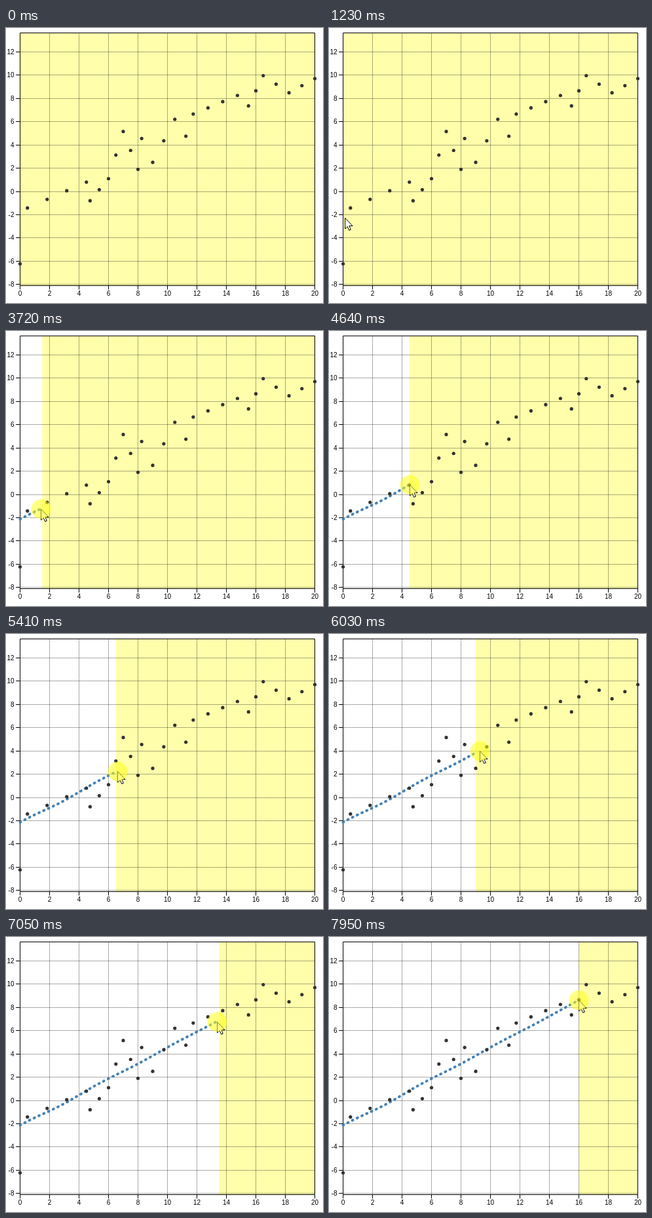
An HTML page that plays this animation: 484x419 px, repeating every 8 s.

```html
<!DOCTYPE html>
<html lang="en">
<head>
<meta charset="utf-8">
<title>Draw the trend</title>
<style>
  html, body { margin: 0; width: 100%; height: 100%; overflow: hidden; background: #fff; }
  svg { display: block; width: 484px; height: 419px; }
  text { font: 10px "Liberation Sans", Arial, sans-serif; }
  .grid { stroke: #000; stroke-opacity: .33; fill: none; }
  .axis { stroke: #000; fill: none; }
  .drawn { stroke: steelblue; stroke-width: 4; stroke-dasharray: 1 7; stroke-linecap: round; fill: none; }
</style>
</head>
<body>
<svg viewBox="0 0 484 419">
  <rect id="cover" y="8" height="384" fill="#ffffab"/>
  <path id="grid" class="grid"/>
  <path id="axis" class="axis"/>
  <g id="labels"></g>
  <path id="line" class="drawn"/>
  <g id="dots" fill="#333"></g>
  <g id="pointer">
    <path d="M.5 .5V17L4.2 13.5 6.7 19.3 9.3 18.2 6.9 12.5H12Z" fill="#fff" stroke="#000"/>
    <circle id="halo" cx=".5" cy=".5" r="15" fill="rgb(255,255,20)" fill-opacity=".54"/>
  </g>
</svg>
<script>
const LOOP = 8000, ENTER = 70, PRESS = 1530, UNCOVER = 2160, DRAG = 2930;
const LEFT = 21.5, RIGHT = 471.5, TOP = 7.5, BOTTOM = 392.5;
const $ = id => document.getElementById(id);
const px = x => LEFT + 22.5 * x;
const py = y => 249 - 17.73 * y;
const mix = (a, b, u) => a + (b - a) * u;

function add(parent, tag, attrs, text) {
  const el = document.createElementNS("http://www.w3.org/2000/svg", tag);
  for (const key in attrs) el.setAttribute(key, attrs[key]);
  if (text !== undefined) el.textContent = text;
  parent.appendChild(el);
}

// Turning points of the data; wide gaps are filled with evenly spaced dots
const turns = [
  [0, -6.22], [.5, -1.42], [4.5, .8], [4.75, -.8], [6, 1.1], [7, 5.15],
  [8, 1.9], [8.25, 4.55], [9, 2.5], [10.5, 6.2], [11.25, 4.75], [11.75, 6.65],
  [14.75, 8.25], [15.5, 7.35], [16.5, 9.95], [18.25, 8.48], [20, 9.7]
];

// Time and pointer x while dragging
const drag = [
  [DRAG, 22], [3702, 53], [4628, 122.5], [5400, 170], [6018, 229.5], [7021, 322], [7948, 381]
];

function dragX(t) {
  const i = drag.findIndex(key => key[0] >= t);
  if (i < 0) return drag[drag.length - 1][1];
  if (i === 0) return drag[0][1];
  const [a, b] = [drag[i - 1], drag[i]];
  return mix(a[1], b[1], (t - a[0]) / (b[0] - a[0]));
}

// Nearly straight hand-drawn line with a wobble that dies away
function trendY(x) {
  const wobble = 1.8 * Math.sin((x - 60) / 18.5) * Math.exp((LEFT - x) / 200);
  return 288.5 - (x - LEFT) * .5333 + wobble;
}

const hold = (t, start, step) => start + Math.floor((t - start) / step) * step;

function pointerAt(t) {
  if (t >= DRAG) {
    const x = dragX(hold(t, DRAG, 77.2));
    return [x, trendY(x)];
  }
  if (t >= 2470) return [22, 291];
  if (t >= 1230) return [24, 289];
  if (t >= 1000) return [19, 293];
  const u = Math.min(1, (hold(t, ENTER, 77.7) - ENTER) / 699);
  const k = 1 - Math.pow(1 - u, 1.5);
  return [mix(207, 27, k), mix(396, 292, k)];
}

// Uncovered width in data units, snapped to half units
function uncovered(t) {
  if (t < UNCOVER) return 0;
  const x = (pointerAt(t)[0] - LEFT) / 22.5;
  return Math.max(.25, Math.round(x * 2) / 2);
}

function linePath(end) {
  let d = `M${LEFT} ${trendY(LEFT)}`;
  for (let x = LEFT + 6; x < end; x += 6) d += `L${x} ${trendY(x)}`;
  return `${d}L${end} ${trendY(end)}`;
}

function buildChart() {
  let grid = "", axis = `M${LEFT} ${TOP}H${RIGHT}V${BOTTOM}H${LEFT}Z`;
  for (let v = 0; v <= 20; v += 2) {
    const x = px(v);
    if (v > 0 && v < 20) grid += `M${x} 8V392`;
    axis += `M${x} ${BOTTOM}v6`;
    add($("labels"), "text", { x, y: 408.3, "text-anchor": "middle" }, v);
  }
  for (let v = -8; v <= 12; v += 2) {
    const y = Math.floor(py(v)) + .5;
    grid += `M22 ${y}H471`;
    axis += `M15 ${y}h6`;
    add($("labels"), "text", { x: 12.5, y: y + 3.2, "text-anchor": "end" }, v);
  }
  $("grid").setAttribute("d", grid);
  $("axis").setAttribute("d", axis);
}

function buildDots() {
  const dot = (x, y) => add($("dots"), "circle", { cx: px(x), cy: py(y), r: 2.6 });
  turns.forEach(([x, y], i) => {
    dot(x, y);
    if (i === turns.length - 1) return;
    const [nextX, nextY] = turns[i + 1];
    const extra = Math.min(2, Math.floor(nextX - x));
    for (let n = 1; n <= extra; n++) {
      const u = n / (extra + 1);
      dot(mix(x, nextX, u), mix(y, nextY, u));
    }
  });
}

function draw(t) {
  const edge = px(uncovered(t));
  $("cover").setAttribute("x", edge);
  $("cover").setAttribute("width", RIGHT - edge);
  $("line").setAttribute("d", t < UNCOVER ? "" : linePath(edge));
  $("pointer").style.display = t < ENTER ? "none" : "";
  $("halo").style.display = t < PRESS ? "none" : "";
  if (t >= ENTER) {
    const [x, y] = pointerAt(t).map(Math.round);
    $("pointer").setAttribute("transform", `translate(${x} ${y})`);
  }
}

buildChart();
buildDots();
draw(0);
const began = performance.now();
function tick() {
  draw((performance.now() - began) % LOOP);
  requestAnimationFrame(tick);
}
requestAnimationFrame(tick);
</script>
</body>
</html>
```
